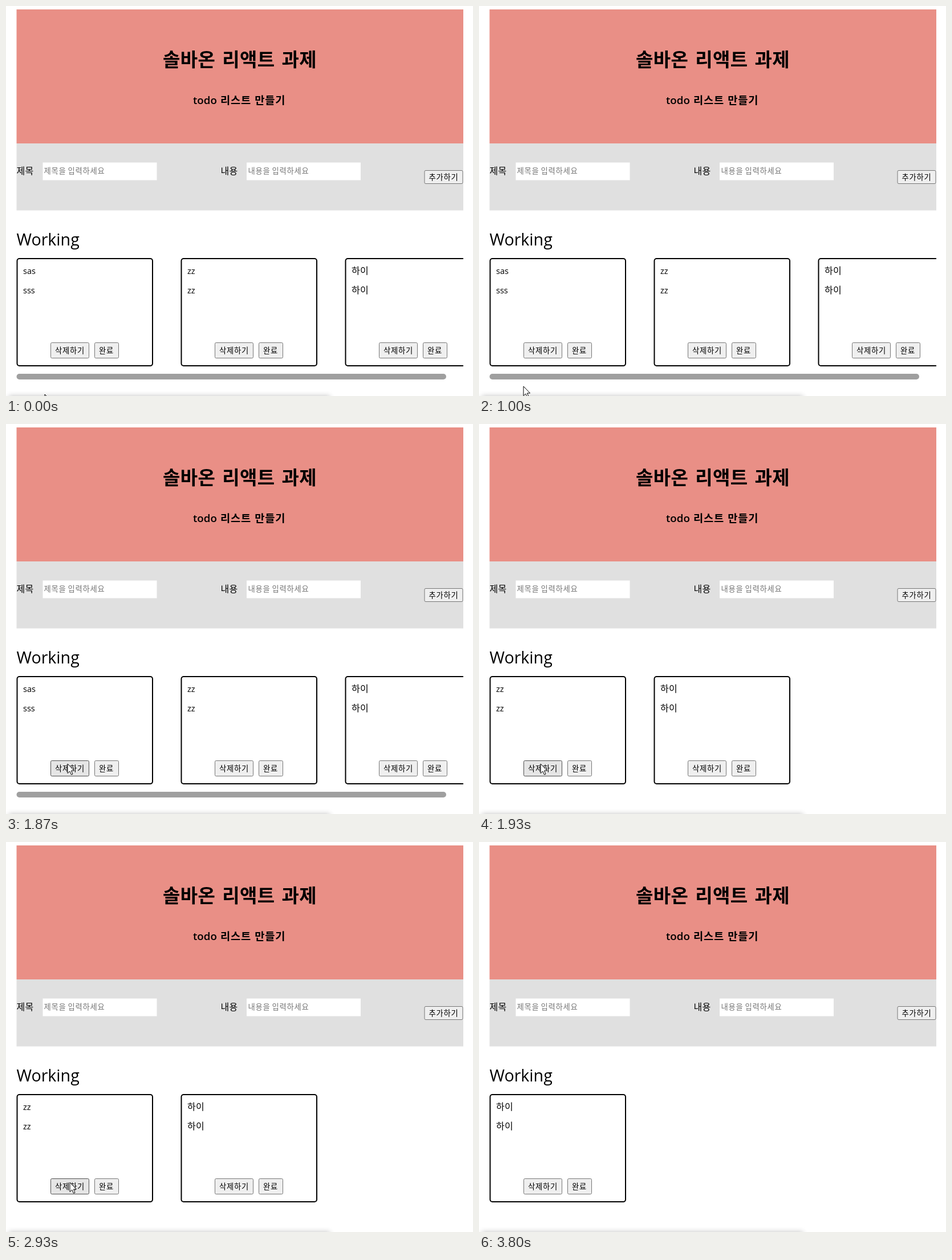
These frames come from a looping animation (819 px wide and 684 px high, 4.34 s). An HTML page:

```html
<!DOCTYPE html>
<html lang="ko">
<head>
<meta charset="utf-8">
<title>todo</title>
<style>
  html, body { margin: 0; width: 100%; height: 100%; overflow: hidden; background: #fff; }
  svg { display: block; }
  text { font: 16px 'Open Sans', 'Noto Sans CJK KR', 'Noto Sans CJK', sans-serif; letter-spacing: .3px; }
  .title { font-size: 33px; font-weight: 700; letter-spacing: .4px; word-spacing: 3px; }
  .subtitle { font-size: 18.7px; font-weight: 700; letter-spacing: .8px; word-spacing: .6px; }
  .subtitle.latin { font-weight: 600; letter-spacing: 0; }
  .heading { font-size: 28.6px; letter-spacing: 0; }
  .small { font-size: 13.33px; letter-spacing: .7px; }
  .hint { fill: #757575; word-spacing: -1px; }
  .latin-item { font-size: 14.5px; letter-spacing: 0; }
  .button rect { fill: #efefef; stroke: #767676; }
  .button.hover rect { fill: #e5e5e5; stroke: #4f4f4f; }
  .card { fill: #fff; stroke: #000; stroke-width: 2; }
  .shadow { filter: blur(5px); opacity: .25; }
</style>
</head>
<body>
<svg width="819" height="684" viewBox="0 0 819 684">
  <defs><clipPath id="page"><rect width="802" height="684"/></clipPath></defs>
  <rect x="18.5" y="6" width="783.5" height="235" fill="#e98f86"/>
  <text class="title" x="275" y="105.5">솔바온 리액트 과제</text>
  <text class="subtitle latin" x="328" y="172">todo</text>
  <text class="subtitle" x="376" y="172">리스트 만들기</text>

  <rect x="18.5" y="241" width="783.5" height="117.5" fill="#e0e0e0"/>
  <text x="18.5" y="295.3">제목</text>
  <text x="376.5" y="295.3">내용</text>
  <rect x="64.5" y="274.5" width="200" height="31" fill="#fff"/>
  <rect x="422" y="274.5" width="200" height="31" fill="#fff"/>
  <text class="small hint" x="66.5" y="293.8">제목을 입력하세요</text>
  <text class="small hint" x="424.5" y="293.8">내용을 입력하세요</text>
  <g id="form"></g>

  <text class="heading" x="18.5" y="420">Working</text>
  <g clip-path="url(#page)"><g id="cards"></g></g>
  <rect id="scrollbar" x="18.5" y="645" width="753.5" height="10" rx="5" fill="#9f9f9f"/>
  <rect class="shadow" x="5" y="684" width="563" height="40"/>
  <path id="cursor" d="M0 0V16.5L3.8 13 6.5 19 9 18 6.5 12H11.5Z" fill="#fff" stroke="#000"/>
</svg>
<script>
const LOOP = 4340, CARD_STEP = 288;
const HOVER_START = 1470, HOVER_END = 3400;
const DELETIONS = [1930, 3070];
const items = [['sas', 'sss'], ['zz', 'zz'], ['하이', '하이']];

// [time, x, y]: each pose is held until the next one
const cursorPoses = [
  [0, 68, 681], [70, 73, 675], [130, 78, 668], [1000, 78, 667],
  [1200, 79, 662], [1270, 83, 645], [1330, 90, 622], [1400, 96, 608],
  [1470, 99, 604], [1530, 101, 602], [1670, 103, 600], [1730, 105, 598],
  [1800, 107, 597], [1870, 108, 596], [2400, 109, 596], [2600, 110, 596],
  [2670, 111, 597], [2730, 112, 597], [3330, 109, 612], [3400, 100, 660],
  [3470, 100, 720]
];

const $ = id => document.getElementById(id);

const button = (x, y, w, h, label) => `<g class="button">
  <rect x="${x}" y="${y}" width="${w}" height="${h}" rx="2"/>
  <text class="small" x="${x + 7.5}" y="${y + h / 2 + 4.8}">${label}</text></g>`;

const itemText = (label, y) =>
  `<text class="${/[a-z]/.test(label) ? 'latin-item' : ''}" x="30" y="${y}">${label}</text>`;

const card = ([title, body], i) => `<g transform="translate(${i * CARD_STEP})">
  <rect class="card" x="19.5" y="443" width="237.5" height="188" rx="4"/>
  ${itemText(title, 470)}${itemText(body, 503.7)}
  ${button(78.5, 590.5, 67, 27, '삭제하기')}${button(155.5, 590.5, 42, 27, '완료')}</g>`;

$('form').innerHTML = button(734, 288.5, 67, 23, '추가하기');
$('cards').innerHTML = items.map(card).join('');
const cards = [...$('cards').children];

function draw(now) {
  const t = now % LOOP;
  const deleted = DELETIONS.filter(time => t >= time).length;
  const hovering = t >= HOVER_START && t < HOVER_END;
  cards.forEach((el, i) => {
    el.style.display = i < deleted ? 'none' : '';
    el.querySelector('.button').classList.toggle('hover', hovering && i === deleted);
  });
  $('cards').setAttribute('transform', `translate(${-deleted * CARD_STEP})`);
  $('scrollbar').style.display = deleted ? 'none' : '';

  const [, x, y] = cursorPoses.findLast(pose => t >= pose[0]);
  $('cursor').setAttribute('transform', `translate(${x} ${y})`);
  requestAnimationFrame(draw);
}
draw(performance.now());
</script>
</body>
</html>
```
